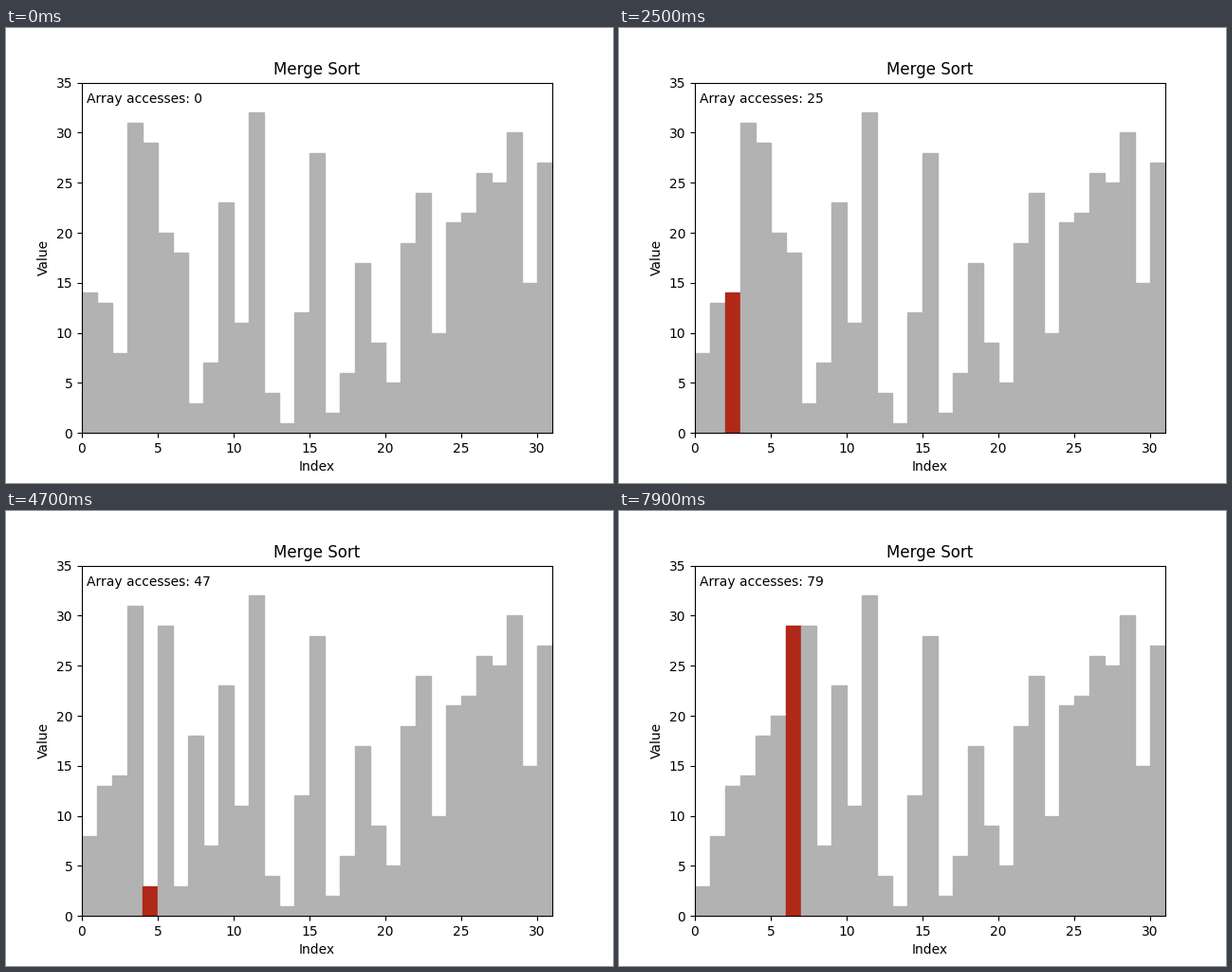
A matplotlib script for the animation above (8000 ms loop, 640x480 px).

```python
import matplotlib.pyplot as plt
from matplotlib.animation import FuncAnimation

GREY, READ, WRITE = "#b2b2b2", "#1fa314", "#b02818"
FRAMES, INTERVAL = 80, 100

VALUES = [14, 13, 8, 31, 29, 20, 18, 3, 7, 23, 11, 32, 4, 1, 12, 28,
          2, 6, 17, 9, 5, 19, 24, 10, 21, 22, 26, 25, 30, 15, 27, 16]


class TrackedList:
    """List that logs every read and write with a snapshot."""

    def __init__(self, items):
        self.items = list(items)
        self.log = [(list(items), None, None)]

    def __getitem__(self, i):
        self.log.append((self.items[:], i, READ))
        return self.items[i]

    def __setitem__(self, i, value):
        self.items[i] = value
        self.log.append((self.items[:], i, WRITE))


def merge(a, start, mid, end):
    merged = []
    left, right = start, mid + 1
    while left <= mid and right <= end:
        if a[left] < a[right]:
            merged.append(a[left])
            left += 1
        else:
            merged.append(a[right])
            right += 1
    for i in range(left, mid + 1):
        merged.append(a[i])
    for i in range(right, end + 1):
        merged.append(a[i])
    for i, value in enumerate(merged, start):
        a[i] = value


def merge_sort(a, start, end):
    if start < end:
        mid = (start + end) // 2
        merge_sort(a, start, mid)
        merge_sort(a, mid + 1, end)
        merge(a, start, mid, end)


tracked = TrackedList(VALUES)
merge_sort(tracked, 0, len(VALUES) - 1)

fig, ax = plt.subplots(figsize=(6.4, 4.8), dpi=100)
bars = ax.bar(range(len(VALUES)), VALUES, width=1, align="edge",
              color=GREY, edgecolor=GREY, linewidth=1)
ax.set(xlim=(0, 31), ylim=(0, 35), xlabel="Index", ylabel="Value",
       title="Merge Sort")
label = ax.text(0.31, 33, "")


def update(n):
    heights, active, color = tracked.log[n]
    for i, (bar, h) in enumerate(zip(bars, heights)):
        bar.set_height(h)
        bar.set_color(color if i == active else GREY)
    label.set_text(f"Array accesses: {n}")
    return [*bars, label]


anim = FuncAnimation(fig, update, frames=FRAMES, interval=INTERVAL,
                     repeat=True, repeat_delay=0)
plt.show()
```
